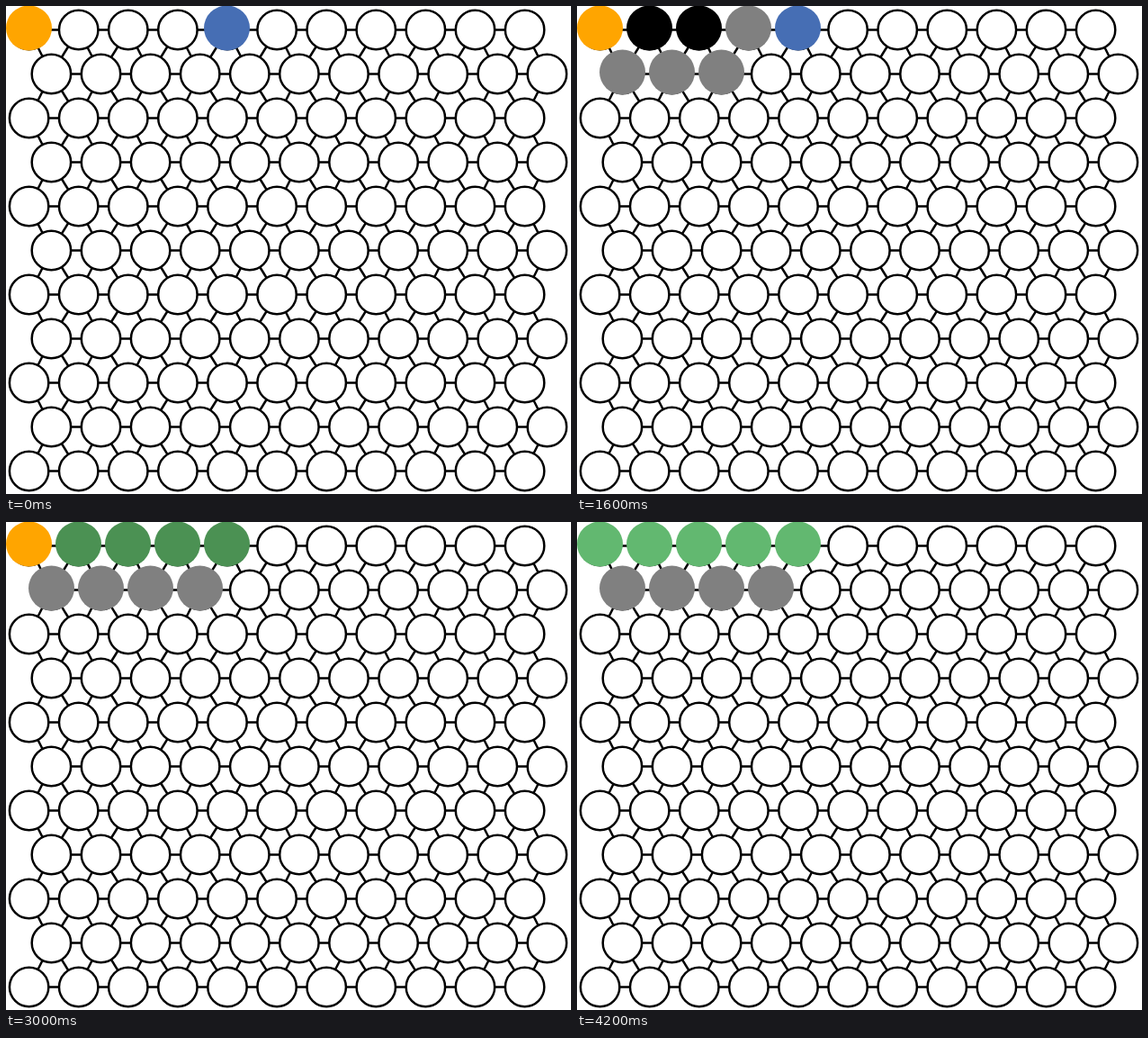
Animation, 628 px wide and 542 px high, one loop 4.4 s. Source, as an HTML page:

```html
<!DOCTYPE html>
<html lang="en">
<head>
<meta charset="utf-8">
<title>Grid path search</title>
<style>
  html, body { margin: 0; width: 100%; height: 100%; overflow: hidden; background: #fff; }
  svg { display: block; }
</style>
</head>
<body>
<svg id="stage" width="628" height="542" viewBox="0 0 628 542"></svg>
<script>
const COLS = 11, ROWS = 11, STEP = 200, LOOP = 4400;
const ORANGE = '#ffa500', BLUE = '#466eb4', GRAY = '#808080', BLACK = '#000',
      GREEN = '#4b9153', LIGHT = '#62b870';

// One [row, column, colour] change per step.
const steps = [
  [0, 1, GRAY], [1, 0, GRAY], [0, 1, BLACK],
  [0, 2, GRAY], [1, 1, GRAY], [0, 2, BLACK],
  [0, 3, GRAY], [1, 2, GRAY], [0, 3, BLACK],
  [1, 3, GRAY], [0, 4, BLACK],
  ...[4, 3, 2, 1, 0].map(c => [0, c, GREEN]),
  ...[0, 1, 2, 3, 4].map(c => [0, c, LIGHT])
];

const stage = document.getElementById('stage');
const nodeX = (r, c) => 25.6 + 55.1 * c + (r % 2) * 24.8;
const nodeY = r => 26.5 + 49 * r;

function add(tag, attrs) {
  const el = document.createElementNS('http://www.w3.org/2000/svg', tag);
  for (const k in attrs) el.setAttribute(k, attrs[k]);
  return stage.appendChild(el);
}

function link(r1, c1, r2, c2) {
  if (r2 >= ROWS || c2 < 0 || c2 >= COLS) return;
  add('line', {
    x1: nodeX(r1, c1), y1: nodeY(r1), x2: nodeX(r2, c2), y2: nodeY(r2),
    stroke: '#000', 'stroke-width': 2.5
  });
}

function eachNode(fn) {
  for (let r = 0; r < ROWS; r++)
    for (let c = 0; c < COLS; c++) fn(r, c);
}

eachNode((r, c) => {
  const left = c - 1 + r % 2;
  link(r, c, r, c + 1);
  link(r, c, r + 1, left);
  link(r, c, r + 1, left + 1);
});
eachNode((r, c) => add('circle', {
  cx: nodeX(r, c), cy: nodeY(r), r: 21.7,
  fill: '#fff', stroke: '#000', 'stroke-width': 2.5
}));

const discs = new Map();
function disc(r, c) {
  const key = r + ',' + c;
  if (!discs.has(key)) discs.set(key, add('ellipse', {
    cx: 25.5 + 55 * c + 25 * r, cy: 24.5 + 49 * r, rx: 25.5, ry: 25
  }));
  return discs.get(key);
}
steps.forEach(([r, c]) => disc(r, c));

function show(count) {
  discs.forEach(d => d.setAttribute('fill', 'none'));
  disc(0, 0).setAttribute('fill', ORANGE);
  disc(0, 4).setAttribute('fill', BLUE);
  for (const [r, c, color] of steps.slice(0, count)) disc(r, c).setAttribute('fill', color);
}

const start = performance.now();
let shown = -1;
function tick() {
  const count = Math.floor((performance.now() - start) % LOOP / STEP);
  if (count !== shown) show(shown = count);
  requestAnimationFrame(tick);
}
tick();
</script>
</body>
</html>
```
